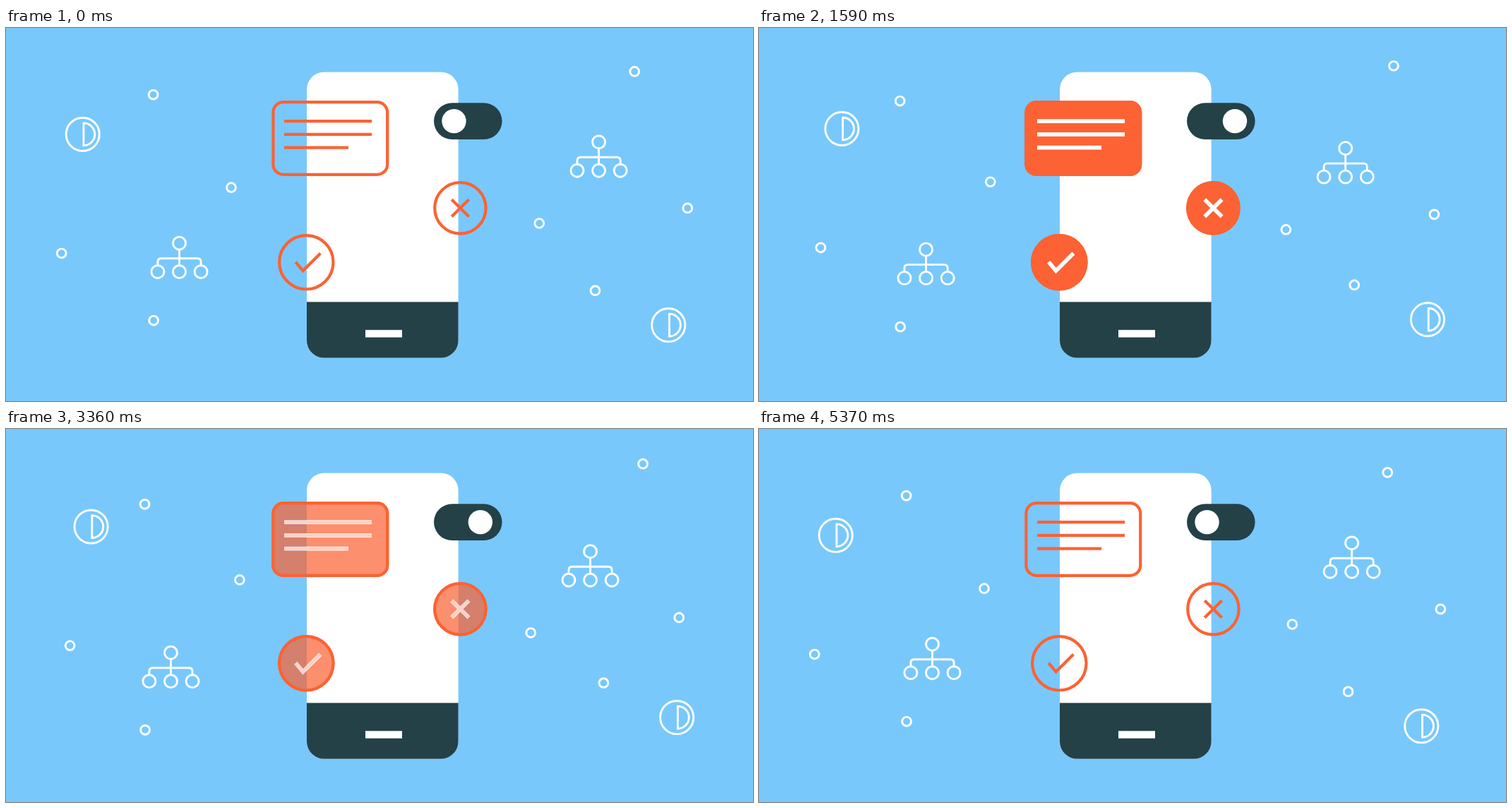
Animation of 1058 by 529 pixels, one loop 5430 ms. Source, as an HTML page:

```html
<!DOCTYPE html>
<html lang="en">
<head>
<meta charset="utf-8">
<title>Phone interface</title>
<style>
  html, body { margin: 0; width: 100%; height: 100%; overflow: hidden; background: #78c8fc; }
  svg { display: block; width: 100%; height: 100%; }
  .icons { fill: none; stroke: #fff; stroke-width: 2.9; }
  .outline { fill: none; stroke: #fc6233; stroke-width: 4.2; }
  .solid { fill: #fc6233; }
  .solid use { fill: none; stroke: #fff; stroke-width: 5.7; }
</style>
</head>
<body>
<svg viewBox="0 0 1058 529">
  <defs>
    <circle id="dot" r="6.4"/>
    <g id="contrast">
      <circle r="23.6"/>
      <path d="M1.2-15.9a15.9 15.9 0 0 1 0 31.8z"/>
    </g>
    <g id="tree">
      <circle r="9"/>
      <circle cx="-30.6" cy="40.5" r="9"/>
      <circle cy="40.5" r="9"/>
      <circle cx="30.6" cy="40.5" r="9"/>
      <path d="M0 9V31.5M-30.6 31.5V26.5q0-5 5-5H25.6q5 0 5 5V31.5"/>
    </g>
    <path id="textLines" d="M394 132.2H518M394 150.9H518M394 169.6H485"/>
    <path id="cross" d="M631.2 243.2L655.6 267.6M655.6 243.2L631.2 267.6"/>
    <path id="check" d="M410.2 331.8L420.6 344.3L445.4 319.6"/>
  </defs>

  <g id="rising" class="icons">
    <use href="#contrast" x="108.7" y="150.8"/>
    <use href="#contrast" x="938.3" y="421.3"/>
    <use href="#dot" x="319" y="226.2"/>
    <use href="#dot" x="78.7" y="319.5"/>
    <use href="#dot" x="890.2" y="61.7"/>
    <use href="#dot" x="834.5" y="372.4"/>
  </g>
  <g id="sinking" class="icons">
    <use href="#tree" x="245.5" y="305.2"/>
    <use href="#tree" x="839.6" y="161.7"/>
    <use href="#dot" x="208.6" y="94.6"/>
    <use href="#dot" x="209.1" y="414.8"/>
    <use href="#dot" x="755.3" y="277"/>
    <use href="#dot" x="965.3" y="255.4"/>
  </g>

  <rect x="426" y="62.5" width="214.6" height="405.3" rx="24.5" fill="#fff"/>
  <path d="M426 388.5H640.6V443.3a24.5 24.5 0 0 1-24.5 24.5H450.5a24.5 24.5 0 0 1-24.5-24.5z" fill="#244147"/>
  <path d="M509 428.3h52v10.4h-52z" fill="#fff"/>

  <g class="outline">
    <rect x="378.4" y="105.2" width="161.8" height="102.6" rx="14.4"/>
    <circle cx="643.4" cy="255.4" r="36.2"/>
    <circle cx="425.3" cy="332.3" r="38.2"/>
    <use href="#textLines"/>
    <use href="#cross"/>
    <use href="#check"/>
  </g>
  <g id="cardFill" class="solid">
    <rect x="376.3" y="103.1" width="166" height="106.8" rx="16.5"/>
    <use href="#textLines"/>
  </g>
  <g id="badgeFill" class="solid">
    <circle cx="643.4" cy="255.4" r="38.3"/>
    <circle cx="425.3" cy="332.3" r="40.3"/>
    <use href="#cross"/>
    <use href="#check"/>
  </g>

  <rect x="606" y="106.2" width="96.6" height="51.8" rx="25.9" fill="#244147"/>
  <circle id="knob" cx="634.5" cy="132.1" r="17.2" fill="#fff"/>
</svg>
<script>
  const LOOP = 5430, DRIFT = 14, FADE = 600;
  const el = id => document.getElementById(id);
  const [rising, sinking, cardFill, badgeFill, knob] =
    ['rising', 'sinking', 'cardFill', 'badgeFill', 'knob'].map(el);

  const ramp = (t, start, length) => Math.min(1, Math.max(0, (t - start) / length));
  const smooth = u => u * u * (3 - 2 * u);
  const swing = (t, start, end) =>
    DRIFT * (1 - Math.cos(2 * Math.PI * ramp(t, start, end - start))) / 2;
  const onOff = (t, on, off, ease = u => u) =>
    ease(ramp(t, on, FADE)) - ease(ramp(t, off, FADE));

  function draw(t) {
    // The rising icons move sideways slightly ahead of their lift.
    const right = swing(t, 70, 5325), up = swing(t, 190, 5350), down = swing(t, 0, 5400);
    rising.setAttribute('transform', `translate(${right} ${-up})`);
    sinking.setAttribute('transform', `translate(${-down} ${down})`);
    cardFill.setAttribute('opacity', onOff(t, 600, 3186));
    badgeFill.setAttribute('opacity', onOff(t, 558, 3186));
    knob.setAttribute('cx', 634.5 + 39.5 * onOff(t, 606, 3276, smooth));
  }

  const begin = performance.now();
  function tick() {
    draw((performance.now() - begin) % LOOP);
    requestAnimationFrame(tick);
  }
  draw(0);
  requestAnimationFrame(tick);
</script>
</body>
</html>
```
